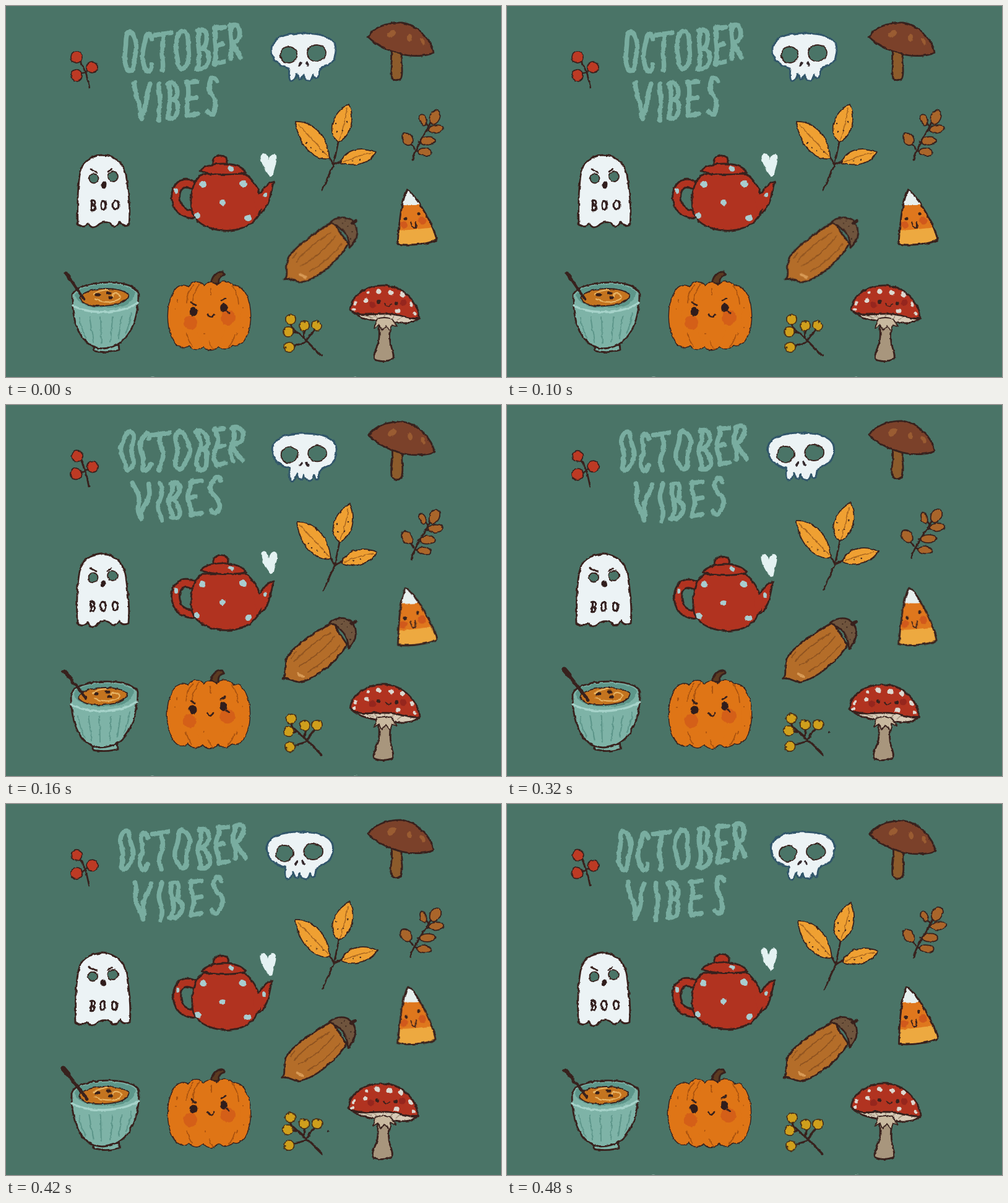
These frames come from a looping animation (800 px wide and 600 px high, 0.64 s). An HTML page:

```html
<!DOCTYPE html>
<html lang="en">
<head>
<meta charset="utf-8">
<title>October vibes</title>
<style>
html, body { margin: 0; width: 100%; height: 100%; overflow: hidden; background: #4a7467; }
svg { display: block; width: 800px; height: 600px; }
g { transform-box: fill-box; transform-origin: center; }
path, ellipse, circle { stroke-linecap: round; stroke-linejoin: round; }
.ink { stroke: #38211d; stroke-width: 2.8; }
.thin { stroke: #38211d; stroke-width: 1.8; }
.line { fill: none; }
.bg { fill: #4a7467; }
.red { fill: #b13320; }
.gold { fill: #efa032; }
.nut { fill: #a9652a; }
.bone { fill: #ecf3f5; }
.teal { fill: #7eb3a7; }
.dark { fill: #301d1c; }
.blush { fill: #c33c1c; opacity: .5; }
</style>
</head>
<body>
<svg viewBox="0 0 800 600" role="img" aria-label="October vibes">
<defs>
  <filter id="rough" filterUnits="userSpaceOnUse" x="0" y="0" width="800" height="600" color-interpolation-filters="sRGB">
    <feTurbulence id="noise" type="fractalNoise" baseFrequency=".11" numOctaves="3" seed="1"/>
    <feDisplacementMap in="SourceGraphic" scale="4" xChannelSelector="R" yChannelSelector="G"/>
  </filter>
  <clipPath id="corn"><path d="M648 298C658 300 689 348 696 378C686 385 650 388 633 385C634 362 638 318 648 298Z"/></clipPath>
</defs>
<g filter="url(#rough)">

<path id="title" class="line" stroke="#79ada0" stroke-width="7.5"/>

<g id="redBerries">
  <path class="line ink" stroke-width="3" d="M120 89L129 108L135 132M117 111L128 107L135 101"/>
  <path class="line" stroke="#3a1f1c" stroke-width="20" d="M114 83h0M139 99h0M114 112h0"/>
  <path class="line" stroke="#bd3a24" stroke-width="16.5" d="M114 83h0M139 99h0M114 112h0"/>
</g>

<g id="skull">
  <path class="bone" stroke="#31566a" stroke-width="3" d="M429 72C428 50 455 44 481 44C511 44 533 52 533 70C533 87 526 95 514 98C506 101 506 106 505 115Q500 121 497 111Q494 123 488 120Q482 120 481 111Q479 121 473 117L470 109Q467 122 461 121Q456 119 458 101C440 97 430 88 429 72Z"/>
  <g class="bg thin"><ellipse cx="457" cy="79" rx="13.5" ry="13"/><ellipse cx="502" cy="76" rx="15" ry="13"/></g>
  <path class="line" stroke="#33272b" stroke-width="3.6" d="M477 92L474 96M485 92L488 96"/>
</g>

<g id="toadstool">
  <path class="ink" fill="#8c5b2b" d="M623 72C626 90 619 105 623 116C627 123 637 122 639 115C643 100 636 90 640 76Z"/>
  <path class="ink" fill="#7b412a" d="M585 50C592 36 615 26 640 27C664 30 688 55 691 75C680 82 655 82 640 78C620 73 602 66 585 50Z"/>
  <g fill="#9a5c32"><ellipse cx="623" cy="45" rx="8" ry="5" transform="rotate(-35 623 45)"/><ellipse cx="652" cy="51" rx="4" ry="6"/><ellipse cx="673" cy="57" rx="3" ry="6" transform="rotate(-25 673 57)"/></g>
</g>

<g id="leaves">
  <path class="line ink" stroke-width="3" d="M511 298L529 258L537 220M522 244L529 257L544 250"/>
  <g class="gold thin">
    <path d="M468 187C492 186 519 205 523 247C498 251 472 225 468 187Z"/>
    <path d="M554 158C564 180 559 210 537 220C518 204 526 174 554 158Z"/>
    <path d="M541 254C546 234 570 225 598 236C590 252 565 263 541 254Z"/>
  </g>
  <path class="line" stroke="#a8651f" stroke-width="1.5" d="M473 192Q498 218 520 243M551 166Q547 195 538 216M545 252Q570 241 592 238"/>
  <path class="line" stroke="#4a2b1b" stroke-width="2.6" d="M486 222h0M493 229h0M501 234h0M512 236h0M533 190h0M535 203h0M544 202h0M551 187h0M560 250h0M571 248h0"/>
</g>

<g id="sprig">
  <path class="line ink" d="M657 250C659 234 678 206 690 182M660 231L651 217M667 219L684 219M662 234L674 236M678 203L690 200M683 195L676 186"/>
  <g class="nut thin">
    <ellipse cx="693" cy="180" rx="8" ry="12" transform="rotate(24 693 180)"/>
    <ellipse cx="674" cy="184" rx="5" ry="9" transform="rotate(-22 674 184)"/>
    <ellipse cx="649" cy="215" rx="8" ry="11" transform="rotate(-32 649 215)"/>
    <ellipse cx="695" cy="199" rx="12" ry="6.5" transform="rotate(-8 695 199)"/>
    <ellipse cx="682" cy="218" rx="12" ry="6.5" transform="rotate(-4 682 218)"/>
    <ellipse cx="677" cy="236" rx="11" ry="6" transform="rotate(5 677 236)"/>
  </g>
</g>

<g id="ghost">
  <path class="bone ink" d="M116 353C115 315 116 285 121 265C126 246 145 241 158 241C181 243 193 259 195 280C199 310 201 330 199 353Q189 358 184 349Q176 362 167 351Q156 347 148 355Q139 362 133 352Q125 361 116 353Z"/>
  <g class="bg thin"><circle cx="142" cy="279" r="7.5"/><circle cx="173" cy="276" r="8"/></g>
  <path class="line ink" stroke-width="2" d="M137 264L147 269M165 268L171 264"/>
  <ellipse class="dark" cx="158" cy="289" rx="4.5" ry="5.5"/>
</g>
<path id="boo" class="line" stroke="#33201f" stroke-width="3.2"/>

<g id="teapot">
  <path class="line" stroke="#38211d" stroke-width="16" d="M303 290C284 281 274 293 274 310C276 329 285 335 301 337"/>
  <path class="line" stroke="#b13320" stroke-width="10" d="M303 290C284 281 274 293 274 310C276 329 285 335 301 337"/>
  <path class="red ink" d="M402 308C417 306 412 289 433 284C427 298 429 326 408 337Z"/>
  <path class="red ink" d="M318 272C300 282 296 310 301 335C311 358 342 365 364 363C392 361 413 342 413 318C411 295 396 278 386 271Z"/>
  <path fill="#b13320" d="M400 309L413 303L417 322L406 336Z"/>
  <g id="lid">
    <path class="red ink" d="M334 256C332 244 342 241 348 242C358 243 360 250 356 256Z"/>
    <path class="red ink" d="M314 267C320 257 340 255 350 255C368 255 382 260 388 269C365 274 335 274 314 267Z"/>
    <path class="line" stroke="#a9cdd0" stroke-width="7" d="M362 262l2 1"/>
  </g>
  <path class="line" stroke="#a9cdd0" stroke-width="10" d="M317 288l1 1M382 287l2 1M350 318h0M309 339h0M391 343h1"/>
  <path class="line" stroke="#a9cdd0" stroke-width="6" d="M275 298v2M419 305v1"/>
</g>

<path id="heart" fill="#e4f2f2" transform-origin="424 255" d="M426 275C419 267 409 249 412 241C416 234 423 241 424 249C427 238 434 236 437 243C439 252 432 266 432 272Q429 276 426 275Z"/>

<g id="acorn">
  <path class="nut ink" style="fill:#b46d29" d="M447 443C455 438 448 425 453 411C462 391 501 367 527 351L551 387C539 410 502 444 475 448C465 449 459 440 447 443Z"/>
  <path class="line" stroke="#8f5320" stroke-width="1.8" d="M466 415Q495 384 524 369M474 422Q510 402 531 374M488 431Q520 413 540 388M461 409l7 -9"/>
  <path class="line" stroke="#d89a55" stroke-width="4" d="M472 435l9 5"/>
  <path class="ink" fill="#6f543d" d="M523 352C534 343 549 342 558 350C569 360 568 381 553 394C554 373 542 361 523 352Z"/>
  <path class="line ink" style="stroke-width:5" d="M558 354L565 350"/>
  <path class="line" stroke="#39251c" stroke-width="2.2" d="M543 354h0M551 359h0M547 350h0M558 368h0M556 379h0"/>
</g>

<g id="candy">
  <g clip-path="url(#corn)">
    <path fill="#e8f0ef" d="M625 290h80v35h-80z"/>
    <path fill="#df771d" d="M625 321Q650 324 705 319V400H625Z"/>
    <path fill="#eda940" d="M625 363Q660 363 705 356V400H625Z"/>
    <g class="blush"><circle cx="643" cy="354" r="6"/><circle cx="673" cy="347" r="6.5"/></g>
  </g>
  <path class="line ink" d="M648 298C658 300 689 348 696 378C686 385 650 388 633 385C634 362 638 318 648 298Z"/>
  <path class="line ink" style="stroke-width:5" d="M646 344h0M667 336h0"/>
  <path class="line thin" d="M654 350Q657 360 662 359Q664 355 662 349"/>
</g>

<g id="bowl">
  <path class="teal ink" d="M144 550C140 556 142 559 150 559Q170 561 183 556L182 548Z"/>
  <path class="teal ink" d="M107 468C107 515 120 551 155 554C195 553 214 515 214 464C208 440 113 442 107 468Z"/>
  <path fill="#5d968a" d="M112 467C118 446 202 445 209 463C205 482 190 487 165 488C140 489 115 484 112 467Z"/>
  <path class="thin" fill="#c4741f" d="M119 472C127 454 185 452 198 467C196 481 176 484 158 485C138 486 122 482 119 472Z"/>
  <path class="line" stroke="#e9b565" stroke-width="2.2" d="M144 474C158 481 183 480 186 471C184 463 170 463 172 470M142 466Q152 459 165 459"/>
  <path class="line" stroke="#351f1a" stroke-width="5" d="M147 467h3M164 464h4M168 472h2"/>
  <path class="line" stroke="#a6d3ca" stroke-width="3.5" d="M108 484Q125 495 158 495Q195 493 213 480"/>
  <path class="line" stroke="#5d968a" stroke-width="2" d="M119 504Q121 522 129 537M135 503L141 543M153 503L154 545M172 504L169 543M187 502L182 537M202 497Q199 518 193 530"/>
</g>
<g id="spoon">
  <path class="line" stroke="#38211d" stroke-width="4.5" d="M102 439L126 474"/>
  <path class="line" stroke="#38211d" stroke-width="7" d="M97 432L103 440"/>
</g>

<g id="pumpkin">
  <path class="ink" fill="#5b3a22" d="M331 449C333 438 338 430 350 430L353 435C344 437 343 443 344 449Z"/>
  <g id="lobes" fill="#df7516"></g>
  <path class="line" stroke="#a9520f" stroke-width="1.8" d="M303 452Q293 462 292 480M312 450Q300 470 302 484M365 453Q375 464 376 482M331 466V456M292 530Q296 544 301 550M329 543Q330 552 336 555M370 532Q366 545 360 551"/>
  <path class="line" stroke="#a9520f" stroke-width="2" d="M277 476v3M274 490h0M383 488h0M383 520h0M374 529l-1 4M321 530h0"/>
  <g class="blush" style="opacity:.38"><circle cx="298" cy="512" r="11"/><circle cx="359" cy="504" r="12"/></g>
  <ellipse class="dark" cx="303" cy="494" rx="6.5" ry="7.5"/><ellipse class="dark" cx="352" cy="488" rx="6" ry="7"/>
  <path class="line ink" stroke-width="2" d="M299 479L307 484M348 477L355 473M326 499Q331 508 336 499M357 494l4 3"/>
</g>

<g id="goldBerries">
  <path class="line ink" style="stroke-width:3.2" d="M510 566L487 543L461 519L459 508M470 528L457 527M481 537L483 519M485 541L502 519M487 543L461 551"/>
  <path class="line" stroke="#493018" stroke-width="18" d="M460 507h0M456 527h0M482 517h0M502 517h0M458 552h0"/>
  <path class="line" stroke="#cf9f1c" stroke-width="14.5" d="M460 507h0M456 527h0M482 517h0M502 517h0M458 552h0"/>
  <path class="line" stroke="#493018" stroke-width="3" d="M458 500h0M450 523h0M482 510h0M504 511h0M452 553h0"/>
</g>
<circle id="speck" class="dark" cx="520" cy="529" r="1.8"/>

<g id="fly">
  <path class="ink" fill="#a8967d" d="M602 510C604 530 604 542 599 552C594 564 592 572 599 573Q612 577 625 571C629 566 623 555 621 544C619 530 622 520 624 510Z"/>
  <path class="ink" fill="#d8cbb7" d="M557 492C575 485 650 488 667 505C655 516 635 513 620 511C595 510 570 506 557 492Z"/>
  <path class="line" stroke="#9a8a76" stroke-width="1.4" d="M573 497l20 7M588 496l14 9M612 496v10M630 497l-7 10M645 501l-13 7"/>
  <path class="thin" fill="#c9b99f" d="M600 506Q596 514 595 521L603 516L608 525L614 517L621 526L624 516L632 519Q627 511 624 506Q612 502 600 506Z"/>
  <path class="red ink" d="M556 491C558 466 585 451 612 452C642 453 667 480 668 505C650 508 637 497 614 498C590 497 568 504 556 491Z"/>
  <path class="line" stroke="#ddd8d0" stroke-width="7" d="M601 461l2 1M621 463l2 1M640 466l1 1M582 476h0M632 493h2"/>
  <path class="line" stroke="#ddd8d0" stroke-width="5" d="M565 480l-1 2M562 491h1M655 481l1 2M660 497l1 1M585 464h0"/>
  <g class="blush" style="fill:#7c1a1c"><circle cx="592" cy="483" r="5.5"/><circle cx="642" cy="480" r="5.5"/></g>
  <path class="line ink" style="stroke-width:6" d="M602 479h0M631 481h0"/>
  <path class="line thin" d="M612 481Q617 489 622 482"/>
</g>

<g id="rim" fill="#86a69a"><ellipse cx="237" cy="602" rx="5" ry="3"/><ellipse cx="565" cy="602" rx="4" ry="3"/></g>
</g>
</svg>
<script>
const $ = id => document.getElementById(id);
const SVG = "http://www.w3.org/2000/svg";
const STEP = 160;

// Letter strokes in a 100 x 100 box
const glyphs = {
  O: "M50 2C10 0 0 30 2 55C4 85 20 100 45 98C85 95 100 70 98 40C96 15 75 0 45 4",
  C: "M95 15C75 -5 30 -5 12 30C-5 65 5 95 40 99C65 101 85 95 95 82",
  T: "M0 8L100 2M52 5L48 100",
  B: "M20 2L15 98M5 5C60 -5 95 10 85 30C75 46 45 48 25 48C80 45 100 62 95 78C85 98 40 100 5 97",
  E: "M15 2L12 98M5 5L95 2M14 50L80 46M12 97L95 92",
  R: "M18 2L15 100M5 6C60 -8 100 8 92 28C85 45 50 52 20 54L98 98",
  V: "M0 0L48 98L100 3",
  I: "M50 0L50 100",
  S: "M95 10C70 -8 20 0 15 25C15 45 90 50 88 72C85 100 30 105 3 90"
};

// Each letter: x, y, width, height
const rows = {
  october: ["OCTOBER", [[192, 41, 18, 65], [221, 44, 15, 62], [240, 42, 26, 62], [275, 39, 21, 64],
    [308, 37, 20, 66], [336, 33, 18, 62], [361, 30, 19, 55]]],
  vibes: ["VIBES", [[207, 124, 26, 60], [246, 125, 4, 60], [261, 123, 18, 60], [291, 121, 20, 58], [325, 116, 16, 60]]],
  boo: ["BOO", [[137, 314, 8, 17], [154, 315, 8, 15], [173, 315, 9, 14]]]
};

// Per pose: shift x of first and last letter, shift y of both, wave height
const shifts = {
  october: [[0, 0, 0, 0, 1], [-4, 2, 0, 5, 3], [-6, 5, 1, 3, 2.6], [-11, 6, 2, 1, 1.8]],
  vibes: [[0, 0, 0, 0, 1], [0, 4, 2, 0, 3], [-1, 10, 3, 2, 2.6], [-11, 10, 3, 2, 1.8]],
  boo: [[0, 0, 0, 0, 0], [-1, -1, 3, 3, 0], [-1, -2, 4, 4, 0], [-1, -1, 3, 3, 0]]
};

// Per pose: dx, dy, rotation, scale x, scale y
const still = [0, 0], alt = (b, c, d = b) => [still, b, c, d];
const poses = {
  redBerries: alt([0, 0, 3, 1.04], [0, 0, 1], [0, 0, 2, 1.03]),
  skull: alt([1, 2, 1], [-6, 1, 0, 1.03], [-3, 1, 0, .99]),
  toadstool: alt([1, 0, .5], [0, -1]),
  leaves: alt([2, 2], [1, 0, 0, 1.02]),
  sprig: alt([-1, 0, 1], [-1, -2, 2, 1.05], [1, -2, 0, 1.04]),
  ghost: alt([-1, 0], [-1, 0, 0, 1.05]),
  teapot: alt([0, 1], [0, 2, 0, .97]),
  lid: alt([1, 0, 1], [1, 1, -1]),
  heart: alt([1, -2], [-1, 2], [-1, -6]),
  acorn: [[2, -2, -1], still, [-1, 0, .5], still],
  candy: alt([-1, 0, -2, 1, 1.05], [0, 0, 1, .96, 1.06]),
  bowl: alt([-2, 0], [0, 0, 0, 1.02]),
  spoon: alt([0, -1, -3, 1.12, 1.06], [0, -1, -4, 1.2, 1.22]),
  pumpkin: alt([-1, -1, .5], [0, -1]),
  goldBerries: alt([1, 1], [0, 0, 0, 1.03]),
  fly: alt([0, 0, .5], [-2, 0, 0, 1.01]),
  rim: alt([0, 0], [0, 1])
};

const make = (name, attrs, parent) => {
  const el = document.createElementNS(SVG, name);
  for (const k in attrs) el.setAttribute(k, attrs[k]);
  return parent ? parent.appendChild(el) : el;
};

// Points along every stroke of every letter
const strokes = {};
for (const ch in glyphs)
  strokes[ch] = glyphs[ch].match(/M[^M]+/g).map(d => {
    const p = make("path", { d }), len = p.getTotalLength();
    return Array.from({ length: 31 }, (_, i) => p.getPointAtLength(len * i / 30));
  });

function write(row, pose) {
  const [word, boxes] = rows[row], [x0, x1, y0, y1, wave] = shifts[row][pose];
  return [...word].map((ch, i) => {
    const [x, y, w, h] = boxes[i], k = i / (word.length - 1);
    const dx = x0 + (x1 - x0) * k, dy = y0 + (y1 - y0) * k;
    return strokes[ch].map(pts => "M" + pts.map(p => {
      const py = y + dy + p.y * h / 100;
      const px = x + dx + p.x * w / 100 + wave * Math.sin(py / 8 + pose * 2 + i);
      return px.toFixed(1) + " " + py.toFixed(1);
    }).join("L")).join("");
  }).join("");
}

// Pumpkin ribs: outlined first, then filled flat to merge them
const ribs = [[286, 502, 24, 50], [371, 501, 24, 48], [308, 501, 26, 54], [354, 500, 26, 54], [331, 502, 25, 54]];
for (const cls of ["ink", ""])
  for (const [cx, cy, rx, ry] of ribs) make("ellipse", { cx, cy, rx, ry, class: cls }, $("lobes"));

function draw(pose) {
  $("noise").setAttribute("seed", [1, 5, 9, 5][pose]);
  $("title").setAttribute("d", write("october", pose) + write("vibes", pose));
  $("boo").setAttribute("d", write("boo", pose));
  for (const id in poses) {
    const [dx, dy, turn = 0, sx = 1, sy = 1] = poses[id][pose];
    $(id).style.transform = `translate(${dx}px,${dy}px) rotate(${turn}deg) scale(${sx},${sy})`;
  }
  $("speck").style.opacity = pose === 2 ? 1 : 0;
}

let shown = -1;
function tick() {
  const pose = Math.floor(performance.now() / STEP) % 4;
  if (pose !== shown) draw(shown = pose);
  requestAnimationFrame(tick);
}
tick();
</script>
</body>
</html>
```
